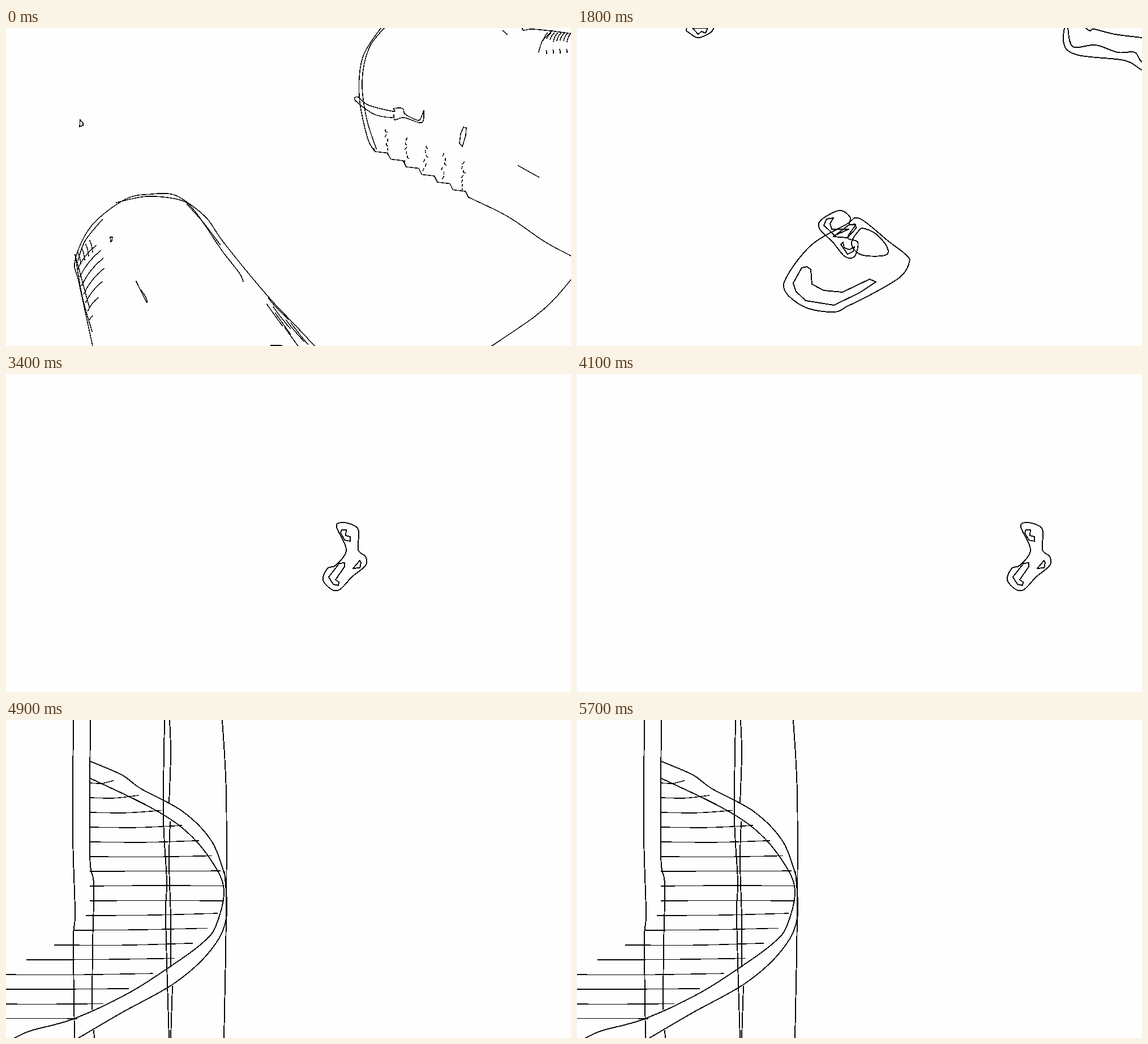
Write an HTML page that moves like this. It is 998x561 px and loops after 5.8 s.

```html
<!DOCTYPE html>
<html>
<head>
<meta charset="utf-8">
<style>
html, body { margin: 0; width: 100%; height: 100%; overflow: hidden; background: #fefefe; }
svg { display: block; width: 998px; height: 561px; }
path { fill: none; stroke: #000; stroke-width: 1.9; stroke-linejoin: round; stroke-linecap: round; shape-rendering: crispEdges; }
.thin path { stroke-width: 1.5; }
</style>
</head>
<body>
<svg id="stage" viewBox="0 0 998 561"></svg>
<script>
const LOOP = 5800, STEP = 100;
const FALL = 120;
const RAIN = 7, STAIRS = 42;
const stage = document.getElementById('stage');

function add(parent, tag, attrs = {}) {
  const node = document.createElementNS('http://www.w3.org/2000/svg', tag);
  for (const key in attrs) node.setAttribute(key, attrs[key]);
  return parent.appendChild(node);
}

// Key points "x,y x,y ..." become a smooth line; z closes it, Z closes it with straight edges.
function curve(text) {
  const p = text.replace(/z/i, '').split(' ').map(s => s.split(',').map(Number));
  if (text.endsWith('Z')) return `M${p.join('L')}Z`;
  const closed = text.endsWith('z');
  const n = p.length;
  const at = i => closed ? p[(i + n) % n] : p[Math.max(0, Math.min(n - 1, i))];
  let d = 'M' + p[0];
  for (let i = 0; i < n - !closed; i++) {
    const [a, b, c, e] = [at(i - 1), at(i), at(i + 1), at(i + 2)];
    const leave = b.map((v, k) => v + (c[k] - a[k]) / 6);
    const enter = c.map((v, k) => v - (e[k] - b[k]) / 6);
    d += `C${leave} ${enter} ${c}`;
  }
  return d + (closed ? 'Z' : '');
}

const stroke = (parent, d) => add(parent, 'path', { d });

function sketch(parent, lines) {
  const g = add(parent, 'g');
  lines.forEach(line => stroke(g, curve(line)));
  return g;
}

let seed = 7;
const random = () => (seed = seed * 16807 % 2147483647) / 2147483647;
const move = (node, x, y) => node.setAttribute('transform', `translate(${x} ${y})`);
const show = (node, on) => node.setAttribute('visibility', on ? 'inherit' : 'hidden');

// ---- Two rounded limbs ----
const limbs = add(stage, 'g', { class: 'thin' });

const right = sketch(limbs, [
  '668,0 641,36 629,95 637,160 654,213',
  '662,0 630,52 624,120 638,192 650,216',
  '818,299 887,333 950,376 998,402',
  '998,444 965,482 930,512 858,561',
  '622,122 617,128 650,152 682,158 685,153 687,162 703,158 734,167 738,146 734,156 728,163 705,152 701,142 685,142 684,147 640,136z',
  '912,0 914,4 930,2 970,6 998,10',
  '941,42 948,22 965,5',
  '878,5 885,11'
]);
stroke(right, 'M650 213L652 218' + 'l22 2.5 5.5 11'.repeat(6));

// Columns of shading ticks above the ragged edge, then a fringe in the corner.
for (let c = 0; c < 5; c++) {
  for (let y = 180 + 14 * c; y < 222 + 16 * c; y += 8) {
    stroke(right, `M${670 + 33.5 * c + random() * 6} ${y}q-1 3 ${random() * 8 - 4} 4`);
  }
}
for (let i = 0; i < 8; i++) {
  stroke(right, `M${956 + i * 6} 9q-5 5 -7 ${8 + random() * 8}`);
  if (i % 2) stroke(right, `M${948 + i * 6} ${36 + random() * 4}q2 3 1 6`);
}

const left = sketch(limbs, [
  '205,800 153,561 129,450 122,410 151,349 211,302 258,293 292,293 318,306 355,336 385,379 465,476 545,561 760,800',
  '127,410 140,375 170,338',
  '195,308 250,297 309,304 335,325 381,392 412,432 419,447',
  '320,311 350,345 378,382',
  '122,400 135,475 152,535',
  '124,407 147,492',
  '468,560 485,560 492,563'
]);

for (let i = 0; i < 7; i++) {
  const reach = 1 - ((i - 1.8) / 4.5) ** 2;
  stroke(left, `M${127 + 3.5 * i} ${424 + 15 * i}q${13 * reach} ${-28 * reach} ${38 * reach} ${-48 * reach}`);
}
for (let i = 0; i < 4; i++) stroke(left, `M${127 + 7 * i} ${396 - 7 * i}q4 8 5 20`);
for (let i = 0; i < 7; i++) {
  const along = random() * 60, inset = random() * 12;
  stroke(left, `M${455 + along - inset} ${465 + along * 1.1 + inset}q12 17 ${26 + random() * 10} 38`);
}

const flecks = sketch(limbs, [
  '131,162 136,168 136,172 130,174Z',
  '184,369 188,369 187,375 185,377Z',
  '230,447 248,483 247,475 239,463',
  '808,175 813,176 812,190 806,209 801,203 803,187Z',
  '905,243 941,263'
]);

// ---- Falling drops ----
const shapes = {
  pair: [
    '815,193 830,191 838,195 846,208 842,220 828,229 811,219 808,204z',
    '814,206 819,205 827,214 836,210 836,218 826,222 815,214Z',
    '769,248 796,244 822,253 815,281 803,297 793,298 789,292 792,284 766,266 764,260z',
    '776,259 787,258 799,268 812,266 814,273 805,290 795,289 794,275 779,266Z'
  ],
  bag: [
    '735,326 786,366 817,390 823,403 806,430 750,463 715,480 690,491 640,483 604,455 608,426 651,372 711,337z',
    '689,358 717,337 728,337 729,343 714,360Z',
    '735,346 744,344 765,354 784,377 780,391 738,390 721,370z',
    '618,440 633,413 642,411 649,416 651,442 672,453 705,456 753,433 764,438 735,457 690,479 640,471 623,455Z'
  ],
  egg: [
    '250,561 223,523 157,477 121,466 92,482 72,543 95,610 200,640z',
    '93,500 96,488 108,475 120,478 97,501Z',
    '137,508 146,499 165,498 199,522 201,540 173,540 140,520z',
    '95,580 78,545 81,530 91,527 101,533 103,548 129,561 150,585z',
    '262,561 260,556 287,542 320,561 295,590z',
    '270,561 276,557 287,559 285,574Z'
  ],
  knot: [
    '431,339 463,322 482,333 481,347 492,347 478,370 496,378 490,403 473,403 452,378 429,355z',
    '436,348 441,337 453,335 447,345 450,355 480,355 455,366Z',
    '466,382 470,378 472,388 481,391 490,386 488,394 478,399Z'
  ],
  tips: [
    '194,0 199,9 216,17 241,0 215,-32z',
    '204,0 214,11 220,6 227,9 231,0Z',
    '870,-40 859,22 882,47 966,57 998,74 1040,90',
    '867,0 876,33 916,30 955,43 985,43 998,60 1030,75',
    '890,-20 899,0 907,5 913,2 950,11 998,17'
  ],
  long: [
    '784,270 793,262 812,266 823,277 822,310 835,322 835,338 811,358 790,380 775,380 760,363 768,343 783,337 801,310z',
    '791,280 793,275 801,275 800,285 808,287 808,295 798,293Z',
    '770,358 789,334 798,333 798,340 782,363 788,367 787,373 778,371Z',
    '813,343 825,329 827,333 825,342Z'
  ]
};

const rain = add(stage, 'g');
const drops = [];
// A drop hangs at its drawn place, shifted by (x, y), at the given tick.
function drop(shape, tick, x = 0, y = 0) {
  drops.push({ node: sketch(rain, shapes[shape]), tick, x, y });
}
drop('pair', 9);
drop('egg', 9);
drop('bag', 18, -236, 10);
drop('knot', 18);
drop('tips', 18);
drop('pair', 27, -258);
drop('bag', 27);
drop('long', 41);
for (let i = 0; i < 3; i++) drop('long', 14 + 10 * i, 200 * i - 600);

// ---- Spiral stairs ----
const SWAY = 13, CYCLE = 8;
const stairs = sketch(stage, [
  '119,0 118,200 122,340 119,388 121,561',
  '149,0 148,235 155,290 153,400 152,510',
  '155,548 156,561',
  '280,0 278,170 284,285 282,350 288,561',
  '289,0 291,60 288,147',
  '290,180 288,250 291,350 291,435',
  '294,470 291,561',
  '382,0 389,130 389,345 385,561',
  '149,73 205,97 238,121 313,162 364,215 389,282',
  '149,103 253,153 317,195 364,250 385,301 370,365 345,395 296,431 218,481 120,527 44,548 15,561',
  '386,268 389,350 361,407 298,464 205,516 128,561'
]);

const treads = add(stairs, 'g', { class: 'thin' });
for (let i = 0; i < 17; i++) {
  const y = 110 + 26 * i;
  const inner = Math.max(-30, 149 - 7 * Math.max(0, i - 8) ** 2);
  const outer = 136 + 250 * Math.sin(Math.PI * (y - 80) / 440);
  const tilt = 4 * Math.cos(i * Math.PI / 8.5);
  stroke(treads, curve(`${inner},${y + 1} ${(inner + outer) / 2},${y + random() * 2} ${outer},${y - 1 + tilt * (i < 9 ? -1 : 1) * .5}`));
}

function draw(time) {
  const tick = Math.floor((time % LOOP) / STEP);
  show(limbs, tick < RAIN);
  show(rain, tick >= RAIN && tick < STAIRS);
  show(stairs, tick >= STAIRS);

  move(left, -12.3 * tick, -39 * tick);
  move(flecks, 0, 45 * tick);
  for (const d of drops) {
    const age = tick - d.tick;
    show(d.node, Math.abs(age) < 7);
    move(d.node, d.x, d.y + age * FALL);
  }
  const phase = (tick - STAIRS + 1) / CYCLE * 2 * Math.PI;
  move(stairs, SWAY * (1 - Math.cos(phase)) / 2, 0);
}

const start = performance.now();
function loop() {
  draw(performance.now() - start);
  requestAnimationFrame(loop);
}
loop();
</script>
</body>
</html>
```
